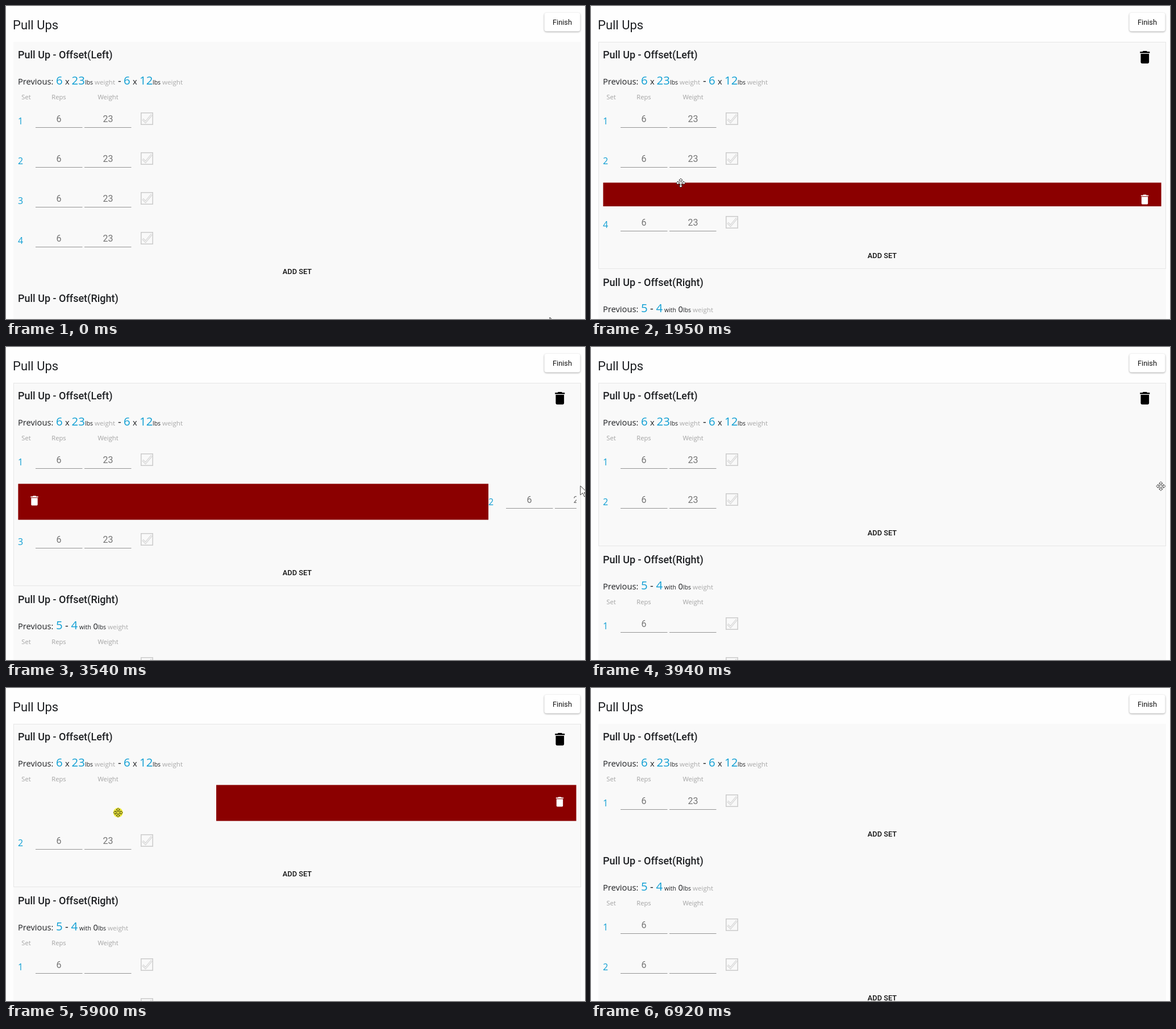
An HTML page for the animation above (7780 ms loop, 1019 by 550 pixels).

```html
<!DOCTYPE html>
<html lang="en">
<head>
<meta charset="utf-8">
<title>Swipe to delete a set</title>
<style>
  html, body { margin: 0; width: 100%; height: 100%; overflow: hidden; background: #fefefe; }
  svg { display: block; }
  text { fill: #1f2124; font-family: "Open Sans", "Noto Sans", sans-serif; }
  .ui { font-family: Roboto, Arial, sans-serif; }
  .page { font-size: 22px; }
  .title { font-size: 18px; font-weight: 500; }
  .button { font-size: 12.8px; fill: #111; }
  .add { font-weight: 500; }
  .body { font-size: 14.7px; }
  .big { font-size: 20.4px; fill: #109fd4; }
  .dash { font-size: 18px; }
  .unit { font-size: 10.5px; }
  .note { font-size: 11.6px; fill: #a8a8a8; }
  .head { font-size: 11.2px; fill: #a2a2a2; }
  .num { font-size: 16px; fill: #109fd4; }
  .value { font-size: 16px; fill: #757575; }
  .mid { text-anchor: middle; }
  .surface { fill: #f9f9f9; }
  .line { stroke: #949494; }
  .finish { fill: #fff; filter: drop-shadow(0 1px 1.5px rgba(0, 0, 0, .35)); }
  .outline { fill: none; stroke: #e6e6e6; }
  .red { fill: #8b0000; }
  .box { fill: none; stroke: #cbcbcb; stroke-width: 1.5; }
  .tick { fill: none; stroke: #cfcfcf; stroke-width: 3.4; }
  .tick + .tick { stroke: #f3f3f3; stroke-width: 1.6; }
  .cursor { fill: #fff; stroke: #2a2a2a; stroke-width: .9; }
  .glow { fill: #f4f040; mix-blend-mode: multiply; }
</style>
</head>
<body>
<svg width="1019" height="550" viewBox="0 0 1019 550">
  <defs>
    <path id="bin" d="M-6 7c0 1.1.9 2 2 2h8c1.1 0 2-.9 2-2V-5H-6zM7-8H3.5l-1-1h-5l-1 1H-7v2H7z"/>
    <path id="tick" d="M219.5 29l5 5 11-13"/>
  </defs>
  <text class="ui page" x="12" y="41">Pull Ups</text>
  <rect class="finish" x="947.5" y="12" width="63" height="32.5" rx="4"/>
  <text class="ui button mid" x="979" y="33">Finish</text>
  <g id="panels"></g>
  <g id="pointer">
    <path id="arrow" class="cursor" d="M0 0V16L4 12.5 7 19 9.5 18 6.7 11.7H12Z"/>
    <path id="move" class="cursor" d="M0-8 3.2-4.8H1.2V-1.2H4.8V-3.2L8 0 4.8 3.2V1.2H1.2V4.8H3.2L0 8-3.2 4.8H-1.2V1.2H-4.8V3.2L-8 0-4.8-3.2V-1.2H-1.2V-4.8H-3.2Z"/>
    <circle id="glow" class="glow" r="8.5"/>
  </g>
</svg>
<script>
const LOOP = 7780, STEP = 78.6, LEAD = 24;
const TOP = 62, LEFT = 21, WIDTH = 983, ROW = 70, ROW_TOP = 108;
const $ = id => document.getElementById(id);
const clamp = v => Math.min(1, Math.max(0, v));
const mix = (a, b, p) => a + (b - a) * p;
const ease = p => p * p * (3 - 2 * p);
const show = (el, on) => el.setAttribute('visibility', on ? 'visible' : 'hidden');
const shift = (el, x, y) => el.setAttribute('transform', `translate(${x} ${y})`);
const text = (cls, x, y, s) => `<text class="${cls}" x="${x}" y="${y}">${s}</text>`;

// Pointer moves: from time, to time, and where it arrives
const moves = [
  [0, 620, 685, 321], [660, 988, 24, 316], [990, 1240, 15, 315], [1340, 1480, 4, 315],
  [1790, 1941, 158, 311], [1950, 2510, 270, 254],
  [2530, 3015, 1005, 250], [3015, 3390, 1011, 244], [3480, 4250, 997, 245],
  [4250, 4490, 831, 219], [4520, 4750, 430, 219], [4750, 4980, 880, 219], [4980, 5110, 831, 219],
  [5270, 6110, 42, 219], [6450, 6900, 285, 620]
];

// Each swipe drags one row, throws it out, then folds its space away
const swipes = [
  { row: 2, grip: 685, press: 650, release: 1330, fold: 1837 },
  { row: 1, grip: 270, press: 2520, release: 3470, fold: 3650 },
  { row: 0, grip: 831, press: 4500, release: 6140, fold: 6470 }
];

const past = (x, cls, s) => text(cls, x, 76, s);
const lbs = x => past(x, 'unit', 'lbs') + past(x + 17, 'note', 'weight');
const panels = [
  {
    title: 'Pull Up - Offset(Left)', count: 4, value: '23',
    past: past(88, 'big', '6') + past(104, 'body', 'x') + past(115.5, 'big', '23') + lbs(139) +
      past(197, 'dash', '-') +
      past(207, 'big', '6') + past(223, 'body', 'x') + past(235, 'big', '12') + lbs(258)
  },
  {
    title: 'Pull Up - Offset(Right)', count: 2, value: '',
    past: past(88, 'big', '5') + past(104, 'dash', '-') + past(114.5, 'big', '4') +
      past(129, 'unit', 'with') + past(153.5, 'body', '0') + lbs(162)
  }
];

const rowMarkup = value => `
  <svg class="row" x="${LEFT}" width="${WIDTH}" height="64">
    <g class="behind">
      <rect class="red" x=".4" y=".4" width="${WIDTH - .8}" height="63.2"/>
      <use class="bin-l" href="#bin" fill="#fff" transform="translate(29 30) scale(.95)"/>
      <use class="bin-r" href="#bin" fill="#fff" transform="translate(953.5 30) scale(.95)"/>
    </g>
    <g class="front">
      <rect class="surface" width="${WIDTH}" height="64"/>
      ${text('num mid', 4.5, 38, '')}
      ${text('ui value mid', 72, 34, '6')}${text('ui value mid', 158.5, 34, value)}
      <path class="line" d="M31 43.5H113.5M117 43.5H199.5"/>
      <rect class="box" x="216.8" y="17.8" width="20.4" height="20.4"/>
      <use class="tick" href="#tick"/><use class="tick" href="#tick"/>
    </g>
  </svg>`;

$('panels').innerHTML = panels.map(p => `
  <g class="panel">
    <rect class="surface back" x="13" y="1" width="999"/>
    ${text('ui title', 21, 29.5, p.title)}
    ${past(21, 'body', 'Previous:')}${p.past}
    ${text('head mid', 35.5, 102, 'Set')}${text('head mid', 93, 102, 'Reps')}${text('head mid', 179.5, 102, 'Weight')}
    ${rowMarkup(p.value).repeat(p.count)}
    <text class="ui button mid add" x="512.5">ADD SET</text>
    <g class="hover">
      <rect class="outline" x="13.5" y="1.5" width="998"/>
      <use href="#bin" transform="translate(974.8 28) scale(1.22)"/>
    </g>
  </g>`).join('');

const pick = (el, ...names) => Object.fromEntries(names.map(n => [n, el.querySelector('.' + n)]));
document.querySelectorAll('.panel').forEach((el, i) => {
  panels[i].el = el;
  panels[i].part = pick(el, 'back', 'add', 'hover', 'outline');
  panels[i].rows = [...el.querySelectorAll('.row')].map(row =>
    ({ row, ...pick(row, 'behind', 'front', 'num', 'bin-l', 'bin-r') }));
});

// Poses are held for one step each, like a screen capture
const hold = t => Math.max(0, Math.floor((t + LEAD) / STEP) * STEP - LEAD);

function pointerAt(t) {
  let x = 957, y = 547;
  for (const [from, to, toX, toY] of moves) {
    const p = ease(clamp((t - from) / (to - from)));
    x = mix(x, toX, p);
    y = mix(y, toY, p);
  }
  return [x, y];
}

function swipeState(s, t) {
  if (!s || t < s.press) return { offset: 0, height: ROW };
  const drag = pointerAt(Math.min(t, s.release))[0] - s.grip;
  const out = clamp((t - s.release) / 120);
  return {
    offset: Math.round(mix(drag, Math.sign(drag) * WIDTH, out)),
    height: Math.round(ROW * (1 - ease(clamp((t - s.fold) / 240))))
  };
}

function draw(now) {
  const t = hold(now % LOOP);
  const [x, y] = pointerAt(t);
  const down = swipes.some(s => t >= s.press && t <= s.release);
  let top = TOP, overRow = down;

  panels.forEach((p, i) => {
    let sum = 0, number = 0;
    p.rows.forEach((r, j) => {
      const { offset, height } = swipeState(i ? null : swipes.find(s => s.row === j), t);
      r.row.setAttribute('y', ROW_TOP + sum);
      r.row.setAttribute('height', Math.min(64, height));
      r.row.setAttribute('display', height ? 'inline' : 'none');
      shift(r.front, offset, 0);
      r.behind.setAttribute('display', offset ? 'inline' : 'none');
      show(r['bin-l'], offset > 0);
      show(r['bin-r'], offset < 0);
      if (height) r.num.textContent = ++number;
      const rowY = top + ROW_TOP + sum;
      if (x > LEFT && x < LEFT + WIDTH && y >= rowY && y < rowY + height) overRow = true;
      sum += height;
    });
    const size = 148 + sum;
    shift(p.el, 0, top);
    p.part.back.setAttribute('height', size);
    p.part.outline.setAttribute('height', size - 2);
    p.part.add.setAttribute('y', 129 + sum);
    show(p.part.hover, x > 13 && x < 1012 && y > top && y < Math.min(top + size, 545));
    top += size;
  });

  shift($('pointer'), x, y);
  show($('move'), overRow);
  show($('arrow'), !overRow);
  show($('glow'), down);
}

const began = performance.now();
function tick() {
  draw(performance.now() - began);
  requestAnimationFrame(tick);
}
tick();
</script>
</body>
</html>
```
